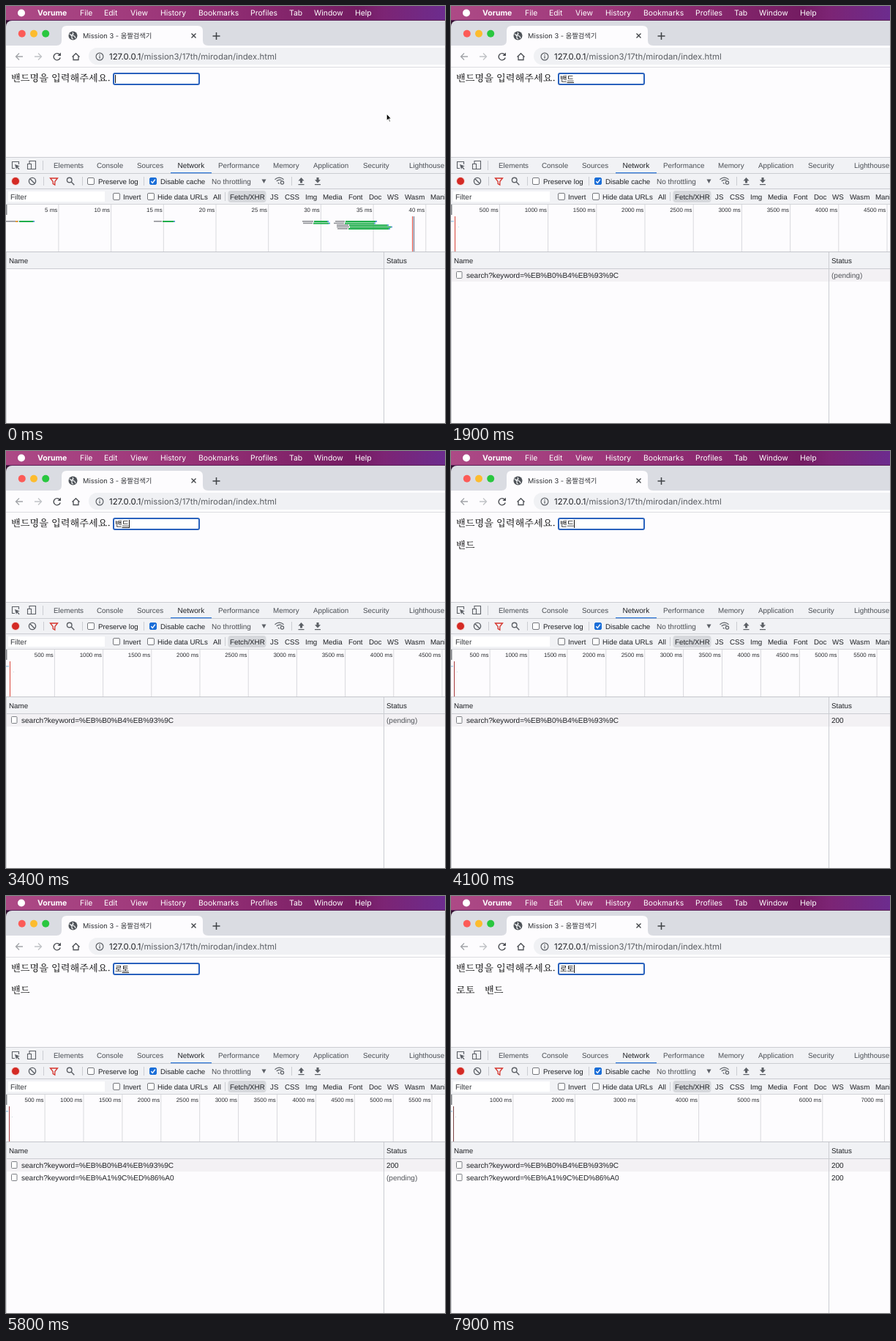
Recreate the animation shown at these times as an HTML page with a canvas. Size 600x569 px, loop 8 s.

```html
<!DOCTYPE html>
<html lang="ko">
<head>
<meta charset="utf-8">
<title>Search demo</title>
<style>
html, body { margin: 0; width: 100%; height: 100%; overflow: hidden; background: #fdfcfe; }
canvas { display: block; width: 600px; height: 569px; }
</style>
</head>
<body>
<canvas id="stage" width="600" height="569"></canvas>
<script>
const c = document.getElementById('stage').getContext('2d');
c.textRendering = 'geometricPrecision';
const LOOP = 8000;
const SANS = '"Liberation Sans", Arial, sans-serif';
const UI = 'Inter, "Noto Sans CJK KR", "Noto Sans CJK", sans-serif';
const KR = '"Noto Serif CJK KR", "Noto Sans CJK KR", "Noto Sans CJK", sans-serif';
const KR_UI = '"Noto Sans CJK KR", "Noto Sans CJK", sans-serif';
const PAPER = '#fdfcfe', PANEL = '#f1f2f5', LINE = '#cbcdd2', INK = '#1f2125', ICON = '#5c6066';

// Input events: time, text, whether the last syllable is still being composed
const typing = [
  [0, '', false], [800, 'ㅂ', true], [900, '배', true], [1100, '밴', true],
  [1200, '밴ㄷ', true], [1300, '밴드', true], [4000, '밴드', false],
  [4200, '밴', false], [4400, '', false], [4700, 'ㄹ', true], [4900, '로', true],
  [5100, '롵', true], [5200, '로토', true], [6800, '로토', false]
];
const requests = [
  { sent: 1600, done: 3600, url: 'search?keyword=%EB%B0%B4%EB%93%9C', name: '밴드' },
  { sent: 5600, done: 6700, url: 'search?keyword=%EB%A1%9C%ED%86%A0', name: '로토' }
];
// Overview scales: start time, ms per mark, px per mark, load line x and colour
const scales = [
  [0, 5, 71.7, 555, '#d8453a'], [1600, 500, 66.2, 5, '#d8453a'],
  [3600, 500, 52.9, 4, '#a83a3c'], [6700, 1000, 84.6, 3, '#7c4544']
];

const at = (list, t) => list.filter(e => e[0] <= t).pop();

function rect(x, y, w, h, fill) {
  c.fillStyle = fill;
  c.fillRect(x, y, w, h);
}

function round(x, y, w, h, r, fill, stroke, lw = 1) {
  c.beginPath();
  c.roundRect(x, y, w, h, r);
  if (fill) { c.fillStyle = fill; c.fill(); }
  if (stroke) { c.strokeStyle = stroke; c.lineWidth = lw; c.stroke(); }
}

function disc(x, y, r, fill) {
  c.beginPath();
  c.arc(x, y, r, 0, 7);
  c.fillStyle = fill;
  c.fill();
}

function draw(path, color, lw = 1.2, fill) {
  const p = new Path2D(path);
  if (fill) { c.fillStyle = fill; c.fill(p); }
  if (color) { c.strokeStyle = color; c.lineWidth = lw; c.stroke(p); }
}

function text(s, x, y, size = 9.75, color = INK, font = SANS, weight = 400) {
  c.font = `${weight} ${size}px ${font}`;
  c.fillStyle = color;
  c.fillText(s, x, y);
  return c.measureText(s).width;
}

const labels = (items, y, ...style) => items.forEach(([s, x]) => text(s, x, y, ...style));

function menuBar() {
  const g = c.createLinearGradient(0, 0, 600, 0);
  [[0, '#ad4a86'], [0.3, '#a03a7c'], [0.55, '#8c2a70'], [0.8, '#741c62'], [0.86, '#7c2474'], [1, '#6c2c8e']]
    .forEach(([p, col]) => g.addColorStop(p, col));
  rect(0, 0, 600, 21, g);
  rect(0, 19, 600, 1, '#5a1f57');
  rect(0, 20, 10, 10, '#33102f');
  disc(21, 9.5, 5, '#fff');
  text('Vorume', 43, 13, 10.5, '#fff', UI, 700);
  labels([['File', 101], ['Edit', 134], ['View', 170], ['History', 211], ['Bookmarks', 263],
    ['Profiles', 334], ['Tab', 387], ['Window', 421], ['Help', 477]], 13, 10.4, '#fff', UI);
}

function browser() {
  round(0, 20, 620, 40, [8, 0, 0, 0], '#dadce2');
  ['#fc5b57', '#fdbc2e', '#29c73f'].forEach((col, i) => disc(21.8 + 16.2 * i, 37.7, 5, col));
  draw('M69 54 Q76 54 76 47 V34 Q76 27 83 27 H262 Q269 27 269 34 V47 Q269 54 276 54 Z', null, 0, PAPER);
  disc(91.5, 40.5, 6, '#4d5157');
  draw('M87 38 L90 41 L90 44 L92 45 M91 36 L92 38 L90 39.5 L94 41.5 L95 44', '#eceef0', 1.3);
  text('Mission 3 - 움짤검색기', 105, 44, 9.3, '#2d2f33', UI);
  draw('M253.5 37.5 L259.5 43.5 M259.5 37.5 L253.5 43.5', '#3f4246', 1.3);
  draw('M287.5 36 V46 M282.5 41 H292.5', '#3f4246', 1.5);

  rect(0, 54, 600, 30, PAPER);
  rect(0, 83, 600, 1, '#dcdde1');
  draw('M23 69 H13.5 M18 64.5 L13.5 69 L18 73.5', '#a2a4a9', 1.3);
  draw('M39 69 H48.5 M44 64.5 L48.5 69 L44 73.5', '#c0c2c6', 1.3);
  draw('M73.5 66.5 A4.6 4.6 0 1 0 74.2 70.5', '#4c4f54', 1.4);
  draw('M75 63.5 V68 H70.5 Z', null, 0, '#4c4f54');
  draw('M90.5 69.5 L95.5 64.7 L100.5 69.5 M92 68.5 V73.5 H99 V68.5', '#4c4f54', 1.3);
  round(113, 57, 520, 23, 11.5, '#f0f1f4');
  c.beginPath();
  c.arc(128, 69, 4.9, 0, 7);
  c.strokeStyle = ICON;
  c.lineWidth = 1.2;
  c.stroke();
  rect(127.4, 68.3, 1.3, 3.4, ICON);
  rect(127.4, 66, 1.3, 1.3, ICON);
  const w = text('127.0.0.1', 141, 73, 11.4, '#1c1e22', UI);
  text('/mission3/17th/mirodan/index.html', 141 + w, 73, 11.4, '#5b5e63', UI);
}

function page(t) {
  text('밴드명을 입력해주세요.', 7, 102.5, 13.2, '#000', KR, 500);
  round(147, 92, 117, 15, 2, '#fff', '#2a62bd', 2);

  const [since, value, composing] = at(typing, t);
  const w = text(value, 149, 103, 10.4, '#111', KR_UI);
  if (composing) {
    const head = c.measureText(value.slice(0, -1)).width;
    rect(149 + head, 104, w - head, 1, '#222');
  }
  if ((t - since) % 1000 < 500) rect(Math.round(149 + w), 94, 1, 11, '#111');

  const found = requests.filter(r => r.done <= t).reverse();
  found.forEach((r, i) => text(r.name, 7 + 39 * i, 132.5, 13.2, '#000', KR, 500));
  if (t < 800) {
    draw('M520 146.3 V157.2 L522.4 155 L524 158.6 L525.8 157.8 L524.2 154.3 H527.3 Z', '#fff', 1.4, '#000');
  }
}

function checkbox(x, y, on) {
  round(x + 0.5, y + 0.5, 9, 9, 1.5, on ? '#1a6ed8' : '#fff', on ? '#1a6ed8' : '#77797e');
  if (on) draw(`M${x + 2.3} ${y + 5.2} l2 2.2 l3.6 -4.8`, '#fff', 1.4);
}

function toolbars() {
  rect(0, 206, 600, 65, PANEL);
  [206, 228, 249].forEach(y => rect(0, y, 600, 1, LINE));
  rect(0, 270, 600, 1, '#d2d4d8');

  draw('M12 221.5 H8.5 V212.5 H17.5 V216', ICON, 1.1);
  draw('M12 216 L18.8 218.6 L16 219.6 L18.6 222.4 L17.6 223.2 L15 220.6 L14 223 Z', null, 0, ICON);
  draw('M32 219.5 V211.5 H40.5 V222.5 H35', ICON, 1.1);
  draw('M29.5 215.5 H34.5 V222.5 H29.5 Z', ICON, 1.1, PANEL);
  rect(50, 211, 1, 13, LINE);
  labels([['Elements', 65], ['Console', 124], ['Sources', 179], ['Performance', 290], ['Memory', 365],
    ['Application', 420], ['Security', 488], ['Lighthouse', 551]], 221, 9.85, '#4a4e54');
  text('Network', 234.5, 221, 10, INK);
  rect(225, 227, 56, 1.3, '#2f76d6');

  disc(13, 239, 6, '#f3d3d2');
  disc(13, 239, 5, '#d42a24');
  draw('M40.6 239 A4.6 4.6 0 1 1 31.4 239 A4.6 4.6 0 1 1 40.6 239 M32.8 235.8 L39.2 242.2', ICON, 1.4);
  draw('M60.5 235 H70.5 L66.8 239.5 V244 L64.2 242.5 V239.5 Z', '#d5342c', 1.3);
  draw('M90 237.5 A3.3 3.3 0 1 1 83.4 237.5 A3.3 3.3 0 1 1 90 237.5 M89.2 240 L93.3 244.2', ICON, 1.4);
  [51, 104, 188, 390].forEach(x => rect(x, 233, 1, 12, LINE));
  checkbox(111, 234);
  text('Preserve log', 126, 242.5);
  checkbox(196, 234, true);
  text('Disable cache', 211, 242.5);
  text('No throttling', 281, 242.5, 10, '#4a4d52');
  draw('M349.5 236.5 H355.5 L352.5 242 Z', null, 0, ICON);
  draw('M367.5 236.8 Q373.5 231.5 379.5 236.8 M369.7 239 Q373.5 235.8 376.5 237.8 M371.8 241 L373.5 242.6', ICON, 1.2);
  c.beginPath();
  c.arc(377.5, 241, 2.1, 0, 7);
  c.stroke();
  draw('M403.5 234 L407.5 238.5 H405 V241.5 H402 V238.5 H399.5 Z', null, 0, ICON);
  draw('M426 241.5 L430 237.3 H427.5 V234 H424.5 V237.3 H422 Z', null, 0, ICON);
  rect(399.5, 243, 8, 1.2, ICON);
  rect(422, 243, 8, 1.2, ICON);

  rect(3, 253, 132, 14, '#fff');
  text('Filter', 6, 264, 10, '#33363a');
  checkbox(146, 255);
  text('Invert', 160, 263.5);
  checkbox(193, 255);
  text('Hide data URLs', 207, 263.5);
  rect(299, 254, 1, 12, LINE);
  round(303.5, 252, 52, 16, 4, '#d6d8dc');
  labels([['All', 283], ['Fetch/XHR', 306], ['JS', 361], ['CSS', 381], ['Img', 409], ['Media', 433],
    ['Font', 468], ['Doc', 496], ['WS', 521], ['Wasm', 545], ['Manifest', 580]], 263.5);
}

function bar(x, y, mid, end) {
  rect(x, y, mid - x - 1, 1.6, '#8f9196');
  rect(mid, y, end - mid - 2, 2, '#1fae4b');
  rect(end - 2, y, 2, 1.8, '#4a90d0');
}

function overview(t) {
  rect(0, 271, 600, 65, PAPER);
  const [start, unit, step, loadX, loadColor] = at(scales, t);
  c.textAlign = 'right';
  for (let i = 1; i * step < 640; i++) {
    const x = i * step - 0.3;
    rect(x, 271, 1, 64, '#d9d9dd');
    text(`${i * unit} ms`, x - 1.2, 281, 7.9, '#2b2d31');
  }
  c.textAlign = 'left';
  rect(0, 271, 1.5, 14, '#85878c');
  if (!start) {
    [[0, 293, 18, 39], [202, 293, 214, 231], [405, 293, 421, 441], [406, 295.6, 420, 443],
      [450, 293, 464, 507], [448, 295.6, 463, 505], [452, 298.2, 469, 523],
      [452, 300.6, 470, 528], [453, 303, 468, 525]].forEach(b => bar(...b));
    rect(13, 293, 3, 2, '#e79a35');
    rect(557, 287, 1, 48, '#5a5c78');
  } else {
    rect(0, 293, loadX - 1, 1.5, '#a9cbe4');
    rect(loadX * 2, 301, 1, 1, '#c9d8df');
  }
  rect(loadX, 287, 1, 48, loadColor);
}

function table(t) {
  rect(0, 335, 600, 1, '#c4c6cb');
  rect(0, 336, 600, 22, PANEL);
  rect(0, 358, 600, 1, LINE);
  text('Name', 4, 351, 9.8);
  text('Status', 520, 351, 9.8);
  requests.filter(r => r.sent <= t).forEach((r, i) => {
    const y = 359 + 17 * i;
    if (i === 0) rect(0, y, 600, 17, '#f3f1f4');
    round(7.5, y + 3.5, 7.5, 9, 1, '#fff', '#7d8085');
    text(r.url, 21, y + 12, 10.05, INK);
    const done = r.done <= t;
    text(done ? '200' : '(pending)', 520, y + 12, 10, done ? INK : '#505358');
  });
  rect(516, 336, 1, 233, LINE);
  rect(0, 336, 1, 233, '#d4d5d9');
}

function frame(now) {
  const t = now % LOOP;
  rect(0, 0, 600, 569, PAPER);
  menuBar();
  browser();
  page(t);
  toolbars();
  overview(t);
  table(t);
}

const origin = performance.now();
function tick() {
  frame(performance.now() - origin);
  requestAnimationFrame(tick);
}
tick();
</script>
</body>
</html>
```
